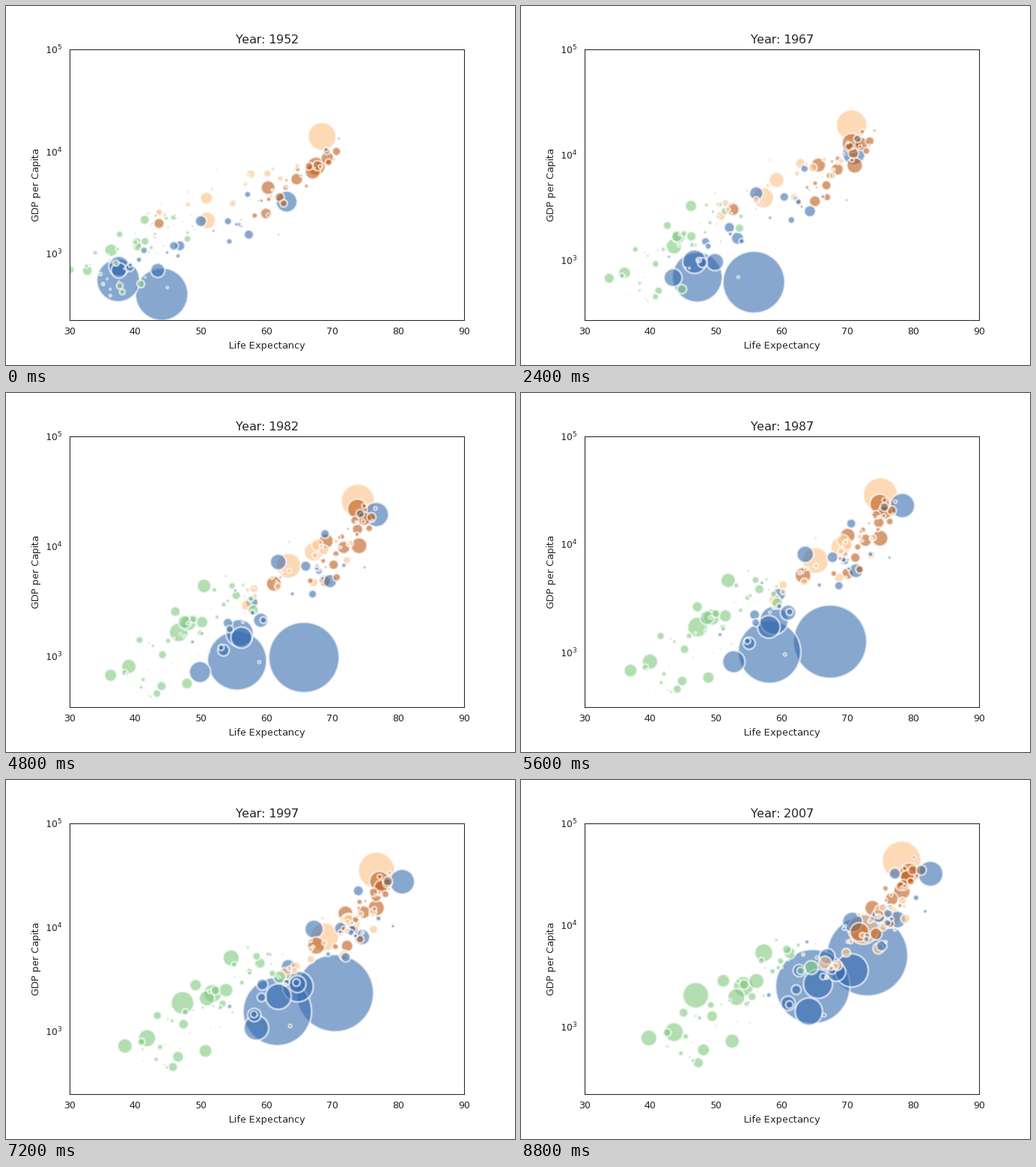
Write a matplotlib script that moves like this. It is 680 by 480 pixels and loops after 9.6 s.

```python
import numpy as np
import matplotlib.pyplot as plt
from matplotlib.animation import FuncAnimation

DPI = 96
STEPS = 12                      # 1952 to 2007, every five years
AFRICA, AMERICAS, ASIA, EUROPE, OCEANIA = (
    "#7fc97f", "#fdc086", "#386cb0", "#bf5b17", "#666666")
GOLDEN = 0.618

u = np.linspace(0, 1, STEPS)
rng = np.random.default_rng(4)
bubbles = []


def track(points, log=False):
    """Pass through evenly spaced key points, in equal ratios if log."""
    p = np.log(points) if log else points
    values = np.interp(u, np.linspace(0, 1, len(p)), p)
    return np.exp(values) if log else values


def add(colour, pop, life, gdp):
    """Population is in millions."""
    bubbles.append((colour, track(pop, True), track(life), track(gdp, True)))


def add_cloud(colour, count, top, fade, growth, life, gdp, spread):
    """Countries of falling size along a band from poor to rich.

    life and gdp hold the (poorest, richest) ends of the band in the first and
    last year; spread is the scatter around it, in years and in log income.
    """
    for rank in range(1, count + 1):
        wealth = rank * GOLDEN % 1
        shift_life = rng.normal(0, spread[0])
        shift_gdp = rng.normal(0, spread[1])
        ages = [np.interp(wealth, (0, 1), ends) + shift_life for ends in life]
        incomes = [lo * (hi / lo) ** wealth * np.exp(shift_gdp) for lo, hi in gdp]
        pop = top * np.exp(-rank / fade)
        rise = u ** rng.uniform(0.7, 0.95)
        wave = rng.normal(0, 0.12) * np.sin(np.pi * u)
        bubbles.append((colour,
                        pop * growth ** (u * (1.2 - 0.2 * u)),
                        ages[0] + (ages[1] - ages[0]) * rise,
                        incomes[0] * (incomes[1] / incomes[0]) ** rise * np.exp(wave)))


# The giants follow their own paths.
add(ASIA, (556, 830, 1110, 1319),                                   # China
    (44, 44.8, 62, 64.8, 67.9, 70.6, 73), (400, 590, 850, 1720, 4959))
add(ASIA, (372, 540, 820, 1110),                                    # India
    (37.4, 49.3, 59, 64.7), (547, 715, 1035, 2452))
add(AMERICAS, (158, 301), (68.4, 71.1, 75.4, 78.2), (13990, 42952))  # United States
add(ASIA, (90, 120, 128), (63, 72.7, 78.9, 82.6),                   # Japan
    (3217, 13200, 24000, 31656))
add(ASIA, (82, 145, 224), (37.5, 54.4, 70.6), (750, 1010, 2100, 3541))  # Indonesia
add(AMERICAS, (57, 121, 190), (50.9, 62.4, 72.4), (2109, 6400, 9066))   # Brazil
add(ASIA, (41, 85, 169), (43.4, 55.2, 65.5), (685, 1020, 1800, 2606))   # Pakistan
add(ASIA, (47, 87, 150), (37.5, 48.4, 64.1), (684, 665, 1391))          # Bangladesh
add(AFRICA, (33, 68, 135), (36.3, 45.2, 47.4, 46.9), (1077, 1600, 2014))  # Nigeria
add(EUROPE, (69, 78, 82), (67.5, 73.2, 79.4), (7144, 20900, 32170))     # Germany
add(AMERICAS, (30, 68, 109), (50.8, 66.2, 76.2), (3478, 8600, 11978))   # Mexico
add(EUROPE, (22, 45, 71), (43.6, 60, 71.8), (1969, 4250, 8458))         # Turkey
add(OCEANIA, (8.7, 20.4), (69.1, 73.5, 81.2), (10040, 34435))           # Australia

add_cloud(AFRICA, 51, 25, 9, 3.7, ((33, 47), (42, 64)),
          ((450, 2600), (450, 7500)), (2.2, 0.25))
add_cloud(AMERICAS, 22, 18, 6, 2.6, ((41, 66), (67, 79)),
          ((2000, 7000), (3000, 17000)), (1.5, 0.2))
add_cloud(ASIA, 27, 30, 6, 3.2, ((38, 60), (60, 80)),
          ((550, 3500), (1100, 32000)), (2.5, 0.25))
add_cloud(EUROPE, 28, 55, 6, 1.2, ((58, 72), (73, 81)),
          ((2600, 11000), (8500, 38000)), (1, 0.12))

bubbles.sort(key=lambda b: -b[1][0])
colours = [b[0] for b in bubbles]
pop, life, gdp = (np.array([b[k] for b in bubbles]) for k in (1, 2, 3))

# The lower income limit follows the poorest state of each year.
floors = np.array((223, 251, 268.5, 266, 268, 288, 341, 309, 275.5, 244.5, 186, 214))
gdp = np.maximum(gdp, 1.25 * floors)

plt.rcParams.update({
    "font.family": "DejaVu Sans", "font.size": 10, "text.color": "0.15",
    "axes.labelcolor": "0.15", "axes.edgecolor": "0.15",
    "xtick.color": "0.15", "ytick.color": "0.15", "axes.linewidth": 0.8,
    "text.hinting_factor": 1})
fig, ax = plt.subplots(figsize=(680 / DPI, 480 / DPI), dpi=DPI)
fig.subplots_adjust(left=0.125, right=0.9, bottom=0.125, top=0.88)
scatter = ax.scatter(life[:, 0], gdp[:, 0], s=pop[:, 0] * 5, c=colours,
                     alpha=0.6, edgecolors="white", linewidth=2)
ax.set_yscale("log")
ax.set_xlim(30, 90)
ax.set_xlabel("Life Expectancy")
ax.set_ylabel("GDP per Capita")
title = ax.set_title("", fontsize=12)
ax.tick_params(which="both", bottom=False, left=False)


def update(step):
    scatter.set_offsets(np.column_stack((life[:, step], gdp[:, step])))
    scatter.set_sizes(pop[:, step] * 5)
    ax.set_ylim(floors[step], 1e5)
    title.set_text(f"Year: {1952 + 5 * step}")
    return scatter, title


anim = FuncAnimation(fig, update, frames=STEPS, interval=800, repeat=True)
plt.show()
```
